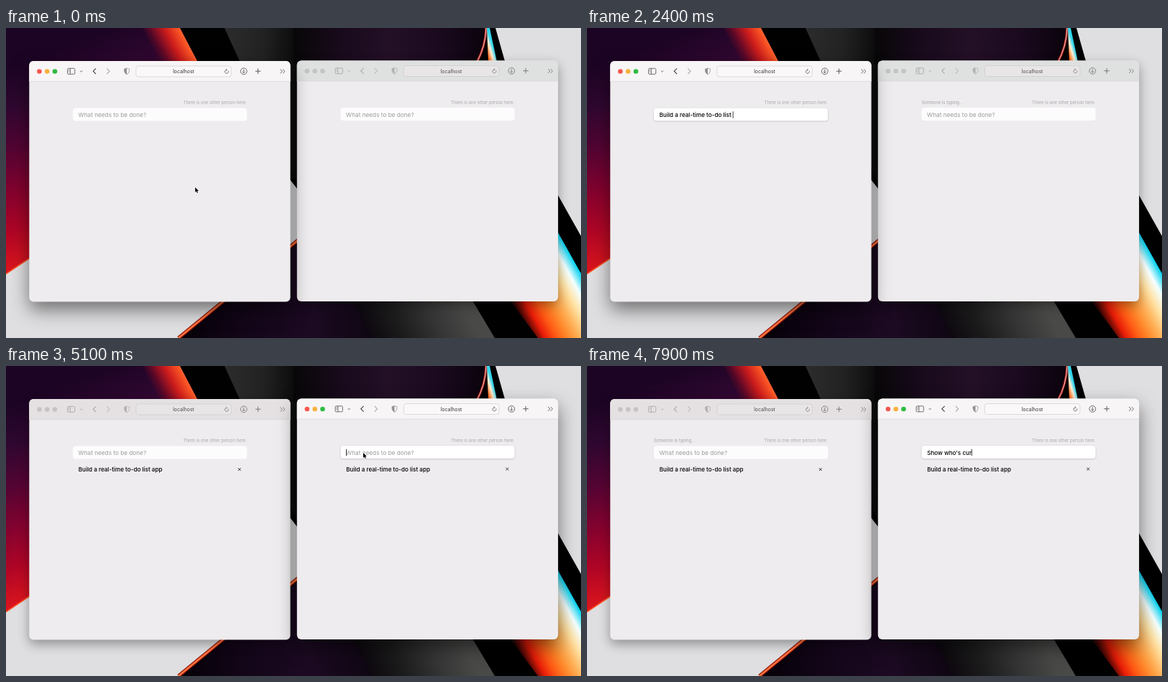
An HTML page with a canvas for the animation above (8000 ms loop, 800 by 432 pixels).

```html
<!DOCTYPE html>
<html lang="en">
<head>
<meta charset="utf-8">
<title>Shared to-do list</title>
<style>
html, body { margin: 0; width: 100%; height: 100%; overflow: hidden; background: #dfdee0; }
canvas { display: block; width: 800px; height: 432px; }
</style>
</head>
<body>
<canvas id="stage"></canvas>
<script>
const W = 800, H = 432, LOOP = 8000, STEP = 100;
const FONT = 'Inter, "Liberation Sans", Arial, sans-serif';
const TASK = 'Build a real-time to-do list app';
const NEXT = "Show who's cur";
const canvas = document.getElementById('stage');
const wall = document.createElement('canvas');
const dpr = window.devicePixelRatio || 1;
for (const el of [canvas, wall]) {
  el.width = W * dpr;
  el.height = H * dpr;
}
let c;

// ---------- drawing helpers ----------
// Gradient with evenly spaced colours
function ramp(x0, y0, x1, y1, ...colors) {
  const g = c.createLinearGradient(x0, y0, x1, y1);
  colors.forEach((color, i) => g.addColorStop(i / (colors.length - 1), color));
  return g;
}
function trace(pts) {
  c.beginPath();
  for (let i = 0; i < pts.length; i += 2) c.lineTo(pts[i], pts[i + 1]);
}
function fill(color) {
  c.fillStyle = color;
  c.fill();
}
function stroke(color, width) {
  c.strokeStyle = color;
  c.lineWidth = width;
  c.stroke();
}
function poly(color, ...pts) {
  trace(pts);
  c.closePath();
  fill(color);
}
function line(color, width, ...pts) {
  trace(pts);
  stroke(color, width);
}
function box(x, y, w, h, r) {
  c.beginPath();
  c.roundRect(x, y, w, h, r);
}
function arc(x, y, r, from = 0, to = Math.PI * 2) {
  c.beginPath();
  c.arc(x, y, r, from, to);
}
function text(str, x, y, size, color, align = 'left', weight = 400) {
  c.font = `${weight} ${size}px ${FONT}`;
  c.textAlign = align;
  c.fillStyle = color;
  c.fillText(str, x, y);
}
function shadow(color, blur, y) {
  c.shadowColor = color;
  c.shadowBlur = blur * dpr;
  c.shadowOffsetY = y * dpr;
}

// ---------- wallpaper ----------
function paintWall() {
  c = wall.getContext('2d');
  c.scale(dpr, dpr);
  c.fillStyle = '#dfdee0';
  c.fillRect(0, 0, W, H);
  poly('#020102', 240, 0, 681, 0, 694, 46, 768, 233, 800, 290, 800, H, 240, H, 440, 268, 264, 46);

  // purple to red sheet with a glowing hem
  poly(ramp(70, 30, 164, 282, '#1c0424', '#2f0730', '#530433', '#82022f', '#b00526', '#dc161c'),
    0, 0, 242, 0, 266, 46, 330, 118, 0, 343);
  line('#ff4a1e', 1.6, 0, 342.5, 33, 320.5);
  poly(ramp(196, 23, 253, -7, 'rgba(60,6,40,0)', '#6a0a26', '#cc1c1c', '#fa5424', '#ffa878'),
    190, 0, 242, 0, 266, 46, 214, 46);

  // charcoal and plum folds along the top
  poly(ramp(304, 0, 412, 0, '#2c2c2d', '#222223', '#080708'), 304, 0, 412, 0, 412, 230, 325, 46);
  poly(ramp(400, 0, 668, 0, '#080708', '#190a1c', '#231027', '#1b0a1f', '#0a030c'),
    400, 0, 669, 0, 655, 50, 400, 50);

  // two bright arms that part below the top edge
  c.beginPath();
  c.moveTo(668, 0);
  c.quadraticCurveTo(667, 26, 655, 48);
  stroke('#b4201c', 3.2);
  stroke('#e8c8c4', 1);
  poly(ramp(670, 48, 683, 44, '#d8200c', '#ff8a3c', '#fff0d8', '#30d4ea'), 669, 0, 673, 0, 683, 47, 671, 47);

  // lower folds
  poly(ramp(260, 0, 510, 0, '#08020b', '#14061a', '#1c0a22', '#0e0612'), 244, H, 444, 270, 510, H);
  poly(ramp(494, 410, 662, 330, '#0c070e', '#1c1c1c', '#353535', '#494948', '#4a4a48'),
    480, 375, 646, 375, 680, H, 510, H);
  for (const [color, width] of [['#7c1510', 5], ['#f2501f', 3], ['#ffa070', 1]]) {
    line(color, width, 240, H, 440, 268);
  }

  // flame
  poly(ramp(769, 286, 680, 335, '#00cfee', '#f4ffff', '#ffe2a4', '#ffb45c', '#ff8a2c',
    '#ff5a14', '#e81c08', '#300404'), 700, 378, 768, 285, 800, 342, 800, H, 740, H);
}

// ---------- browser window ----------
function chevron(x, y, dx, dy, color, width) {
  line(color, width, x - dx, y - dy, x + dx, y, x - dx, y + dy);
}
function toolbar(active) {
  const pick = (on, off) => active ? on : off;
  const soft = pick('#636163', '#a9a8aa');
  const firm = pick('#5c5a5c', '#7a797b');
  const pale = pick('#929092', '#b2b0b2');
  ['#f4574f', '#f6b23c', '#2fbb42'].forEach((color, i) => {
    arc(46.4 + i * 10.8, 60.5, 3.3);
    fill(pick(color, '#c5c3c5'));
  });

  // sidebar and history
  box(85.6, 56.3, 10.2, 8, 1.3);
  stroke(soft, 0.9);
  line(soft, 0.9, 89.4, 56.3, 89.4, 64.3);
  for (let y = 58.2; y < 62; y += 1.5) line(soft, 0.6, 86.8, y, 88.3, y);
  line(soft, 0.9, 103, 59.6, 104.7, 61.2, 106.4, 59.6);
  chevron(123.2, 60.2, -1.9, 3.9, pick('#403e40', '#a9a8aa'), 1.1);
  chevron(142.2, 60.2, 1.9, 3.9, pick('#aaa8aa', '#bdbbbd'), 1.1);

  // half-filled shield
  for (const side of [-1, 1]) {
    c.beginPath();
    c.moveTo(168, 56);
    c.lineTo(168 + side * 3.5, 57.2);
    c.quadraticCurveTo(168 + side * 4, 62.5, 168, 64.8);
    stroke(pale, 0.8);
    if (side < 0) fill(pale);
  }

  // address field
  box(180.8, 53, 132.6, 15, 3.5);
  fill(pick('#faf8f9', '#e8e5e7'));
  stroke(pick('#d5d2d4', '#d0ced0'), 0.8);
  text('localhost', 247, 63.1, 6.94, pick('#343234', '#4b494b'), 'center');
  arc(307, 60.8, 2.5, -0.4, 4.6);
  stroke(firm, 0.8);
  chevron(307, 58.3, 0.8, 1.3, firm, 0.8);

  // download, new tab, more
  arc(330.8, 60.3, 4.4);
  stroke(firm, 0.9);
  line(firm, 0.9, 330.8, 57.7, 330.8, 62.6);
  line(firm, 0.9, 328.9, 60.8, 330.8, 62.7, 332.7, 60.8);
  line(firm, 1, 346.9, 60.2, 354.3, 60.2);
  line(firm, 1, 350.6, 56.5, 350.6, 63.9);
  for (const x of [383, 386.6]) chevron(x, 60.4, 1.5, 2.9, firm, 0.9);
}
function page(s) {
  const task = (str, y) => text(str, 100.7, y, 8.12, '#000', 'left', 500);
  text('There is one other person here.', 335, 106.4, 5.94, '#aaa8ab', 'right');
  if (s.notice) text('Someone is typing...', 93, 106.4, 5.98, '#a5a3a6');

  c.save();
  if (s.focus) shadow('rgba(0,0,0,.25)', 2, 0.5);
  box(93, 111.6, 242.2, 18, 4);
  fill(s.focus ? '#fff' : '#fdfcfd');
  c.restore();
  if (s.typed) task(s.typed, 124.1);
  else text('What needs to be done?', 100.6, 124.1, 8.23, '#9b999c');
  if (s.focus) {
    const end = 101 + (s.typed ? c.measureText(s.typed).width : 0);
    line('#111', 0.8, end, 116.2, end, 125.8);
  }
  if (s.item) {
    task(TASK, 147);
    for (const d of [-1.9, 1.9]) line('#222', 0.9, 324.8 - d, 142.2, 324.8 + d, 146);
  }
}
function browser(dx, dy, idle, s) {
  c.save();
  c.translate(dx, dy);
  c.save();
  if (s.active) shadow('rgba(0,0,0,.5)', 26, 11);
  else shadow('rgba(0,0,0,.36)', 16, 6);
  box(32.3, 46, 363.3, 335.6, 6);
  fill('#eeecee');
  c.restore();
  box(32.3, 46, 363.3, 28.4, [6, 6, 0, 0]);
  fill(s.active ? '#f8f5f6' : idle);
  line('#dad7d9', 0.8, 32.3, 74.4, 395.6, 74.4);
  toolbar(s.active);
  page(s);
  c.restore();
}

// ---------- pointer ----------
const ease = u => u * u * (3 - 2 * u);
function glide(t, start, end, from, to) {
  const u = ease(Math.min(1, Math.max(0, (t - start) / (end - start))));
  return from.map((v, i) => v + (to[i] - v) * u);
}
function pointerAt(t) {
  const rest = [263.2, 222], field = [262, 122], other = [459, 219];
  if (t < 3000) return glide(t, 0, 300, rest, field);
  if (t < 3500) return glide(t, 3000, 3500, field, [260, 210]);
  if (t < 4400) return glide(t, 3500, 4200, [260, 210], other);
  return glide(t, 4400, 4900, other, [497, 121]);
}
function pointer(x, y) {
  c.save();
  c.translate(x, y);
  trace([0, 0, 0, 7, 1.6, 5.6, 2.7, 8.1, 3.8, 7.6, 2.8, 5.2, 4.9, 5.1]);
  c.closePath();
  c.lineJoin = 'round';
  stroke('#fff', 1.2);
  fill('#000');
  c.restore();
}

// ---------- timeline ----------
const typedCount = (t, start, per) => Math.max(0, Math.floor((t - start) / per) + 1);
function nextCount(t) {
  return Math.min(4, typedCount(t, 5400, 120)) + typedCount(t, 6000, 200);
}
function draw(t) {
  const switched = t >= 4200;
  const left = {
    active: !switched, item: t >= 2900, focus: t >= 300 && t < 2900, notice: t >= 5500,
    typed: t < 2900 ? TASK.slice(0, typedCount(t, 500, 66.7)) : ''
  };
  const right = {
    active: switched, item: t >= 3000, focus: t >= 5000, notice: t >= 600 && t < 3000,
    typed: NEXT.slice(0, nextCount(t))
  };
  c = canvas.getContext('2d');
  c.setTransform(1, 0, 0, 1, 0, 0);
  c.drawImage(wall, 0, 0);
  c.scale(dpr, dpr);
  const windows = [
    () => browser(0, 0, '#e5e1e3', left),
    () => browser(372.5, -0.5, '#dfe0e0', right)
  ];
  if (!switched) windows.reverse();
  windows.forEach(show => show());
  if (t < 500 || (t >= 3000 && t < 5400)) pointer(...pointerAt(t));
}

paintWall();
const began = performance.now();
let last = -1;
function tick() {
  const t = Math.floor(((performance.now() - began) % LOOP) / STEP) * STEP;
  if (t !== last) draw(last = t);
  requestAnimationFrame(tick);
}
tick();
</script>
</body>
</html>
```
